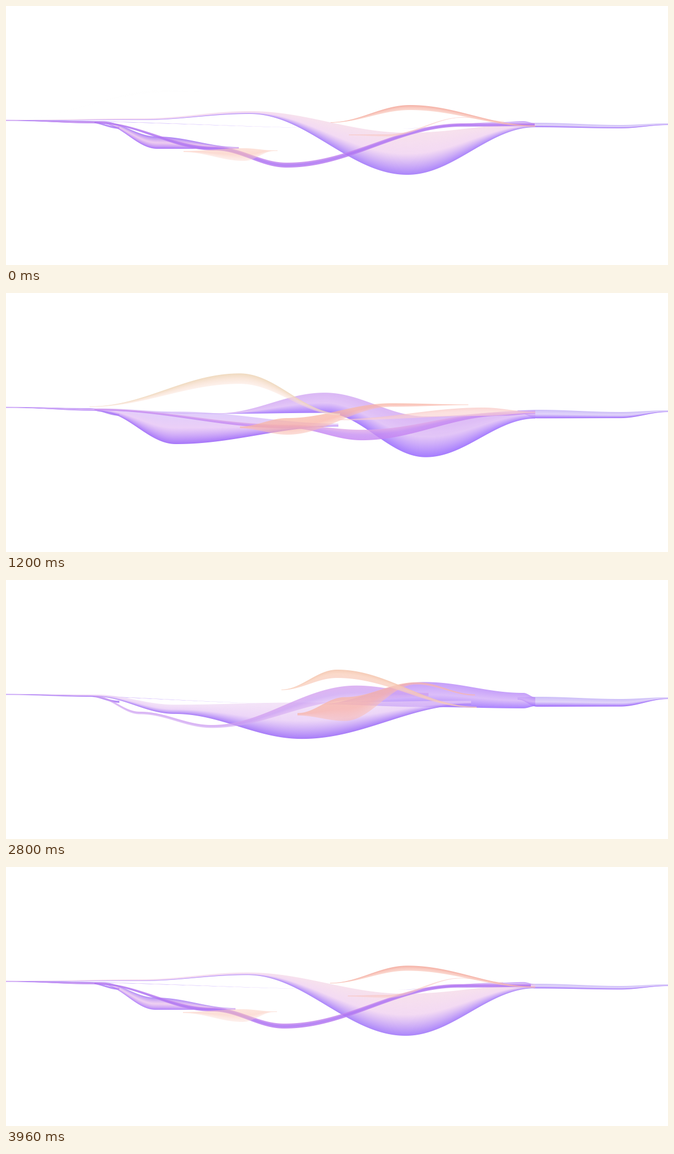
An HTML page with a canvas that plays this animation: 1197 by 468 pixels, repeating every 4 s.

```html
<!DOCTYPE html>
<html lang="en">
<head>
<meta charset="utf-8">
<title>Flowing ribbons</title>
<style>
  html, body { margin: 0; width: 100%; height: 100%; overflow: hidden; background: #fff; }
  canvas { display: block; }
</style>
</head>
<body>
<canvas id="stage" width="1197" height="468"></canvas>
<script>
const ctx = document.getElementById('stage').getContext('2d');
const LOOP = 4;     // seconds
const DRIFT = 113;  // crests travel right, pixels per second
const FADE = 0.4;

const clamp = (v, low, high) => Math.min(high, Math.max(low, v));

// Smooth path through values spread evenly over u = 0..1; a plain number stays constant.
function spread(values, u) {
  if (!Array.isArray(values)) return values;
  const last = values.length - 1;
  const p = clamp(u, 0, 1) * last, i = Math.min(Math.floor(p), last - 1);
  const step = k => values[k + 1] - values[k];
  const slope = k => {
    if (k === 0) return step(0);
    if (k === last) return step(last - 1);
    const a = step(k - 1), b = step(k);
    return a * b > 0 ? 2 * a * b / (a + b) : 0;
  };
  const s = p - i, r = 1 - s;
  return r * r * ((1 + 2 * s) * values[i] + s * slope(i)) +
         s * s * ((1 + 2 * r) * values[i + 1] - r * slope(i + 1));
}

const channels = hex => [0, 2, 4, 6].map(i => parseInt(hex.slice(i, i + 2), 16));
function mixColor(colors, u) {
  const rgba = [0, 1, 2, 3].map(k => spread(colors.map(c => channels(c)[k]), u));
  return `rgba(${rgba[0]},${rgba[1]},${rgba[2]},${rgba[3] / 255})`;
}

const sway = t => Math.cos((t - 3.75) * 2 * Math.PI / LOOP);
const humpX = t => Math.min(900, 185 + 160 * t);

// A node is a crest or trough: x, top edge, bottom edge. Values run over the ribbon's life.
// Colours run from top edge to bottom edge, each a list over the life.
const ribbons = [
  { // stem
    from: 0, to: LOOP, still: true,
    nodes: [[0, 205.7, 207.6], [150, 208, 211], [205, 218, 222]],
    colors: [['be96fab0'], ['a573f5e6'], ['b48cf5c8']]
  },
  { // tail
    from: 0, to: LOOP, still: true,
    nodes: [
      [925, 212, 216],
      [960, 211, [219, 225, 231, 228, 219]],
      [1110, 215, [221, 225, 230, 228, 221]],
      [1197, 212, 215]
    ],
    colors: [['b9a5f5b8'], ['d6c4f8b8'], ['965ffaf0']]
  },
  { // leaf: a trough that swells while it crosses the stage
    from: 0, to: 2 * LOOP,
    nodes: [
      [0, 206, 206.8],
      [t => Math.max(160, DRIFT * t - 205), [208, 209, 203, 225, 222], [212, 213, 206, 225, 222]],
      [t => Math.max(170, DRIFT * t - 12),
        [208, 208, 216, 226, 190, 182, 174, 188, 210], [212, 213, 228, 243, 195, 212, 233, 228, 212]],
      [t => Math.min(935, 213 + DRIFT * t + 65 * sway(t)),
        [236, 212, 233, 220, 229, 226, 204, 204, 208], [258, 273, 273, 291, 305, 301, 258, 228, 218]],
      [t => Math.min(957, 420 + 150 * t), [255, 226, 212, 212, 212], [258, 232, 219, 231, 219]]
    ],
    colors: [
      ['a073f5e6', 'e4ccfa90', 'f4d6e6b8', 'b884f8c8', 'b080f8b0'],
      ['e1aae699', 'e0bef8b0', 'f0d0f0c8', 'cfa8f8c8', 'd2aaf4b0'],
      ['a56efaf2', '9f6ef8f0', 'a57dfaf0', '9a6cffe8', 'a078ffd0']
    ]
  },
  { // strand
    from: 2, to: 6,
    nodes: [
      [160, 209, 212],
      [t => Math.max(165, DRIFT * t - 75), [215, 242, 254, 238, 240], [219, 247, 261, 246, 240]],
      [t => DRIFT * t + 55, [262, 262, 283, 253, 224], [266, 268, 292, 272, 236]],
      [humpX, [200, 190, 212, 216, 213], [230, 216, 218, 222, 216]],
      [t => Math.min(957, humpX(t) + 130), [217, 203, 212, 214, 214], [220, 210, 217, 218, 217]]
    ],
    colors: [
      ['e0b9f0c8', 'c888eccc', 'f4c4e2c0'],
      ['e6c4f090', 'a972f4e0', 'e0a4f0b0'],
      ['eed6f450', 'bd80f0d8', 'cd8cf4d0']
    ]
  },
  { // ember
    from: 0, to: LOOP,
    nodes: [
      [[320, 420, 430, 550, 620], [262, 240, 252, 238, 232], [264, 243, 257, 242, 234]],
      [t => 430 + 65 * t, [257, 231, 211, 212, 232], [280, 256, 256, 254, 236]],
      [[485, 700, 670, 760, 825], [261, 206, 182, 186, 201], [262, 213, 186, 190, 202]],
      [[490, 840, 800, 860, 900], [261, 200, 214, 206, 208], [262, 201, 216, 208, 209]]
    ],
    colors: [
      ['fac8b888', 'f6b09cc8', 'f8c3beaa'],
      ['fac0b090', 'f8aca0cc', 'f9c8c3a0'],
      ['fad2c860', 'f9b4a890', 'fad2cd60']
    ]
  },
  { // veil
    from: 0.4, to: 5.2,
    nodes: [
      [[0, 230, 497, 586, 600], [205, 205, 198, 210, 228], [206, 206, 199, 211, 230]],
      [t => 290 + 110 * t, [151, 144, 162, 179, 207], [165, 164, 177, 188, 222]],
      [[366, 695, 850, 957, 957], [154, 232, 229, 216, 215], [155, 236, 231, 218, 217]]
    ],
    colors: [
      ['f0d6bce0', 'ecd2b2dc', 'f4c4ace0', 'f3a79ae6', 'f8c4c0b0'],
      ['f6decdc0', 'f8dccab0', 'f9cdb8c0', 'f8bcb0cc', 'fad0cea0'],
      ['f8e1d760', 'fad8c860', 'f8c8b8b0', 'f9c8bcb0', 'fad0d0a0']
    ]
  }
];

function drawRibbon({ from, to, still, nodes, colors }, t) {
  const outside = Math.max(from - t, t - to, 0);
  if (outside >= FADE || (still && outside > 0)) return;
  const u = (t - from) / (to - from);
  const points = nodes.map(([x, top, bottom]) =>
    [typeof x === 'function' ? x(t) : spread(x, u), spread(top, u), spread(bottom, u)]);
  const stops = colors.map(list => list.length > 1 ? mixColor(list, u) : '#' + list[0]);
  ctx.globalAlpha = 1 - outside / FADE;
  for (let i = 1; i < points.length; i++) {
    const [x0, top0, bottom0] = points[i - 1], [x1, top1, bottom1] = points[i];
    for (let x = Math.ceil(x0); x < x1; x++) {
      const swing = (1 - Math.cos(Math.PI * (x - x0) / (x1 - x0))) / 2;
      const top = top0 + (top1 - top0) * swing;
      const bottom = bottom0 + (bottom1 - bottom0) * swing;
      if (bottom - top < 0.05) continue;
      const fill = ctx.createLinearGradient(0, top, 0, bottom);
      stops.forEach((color, k) => fill.addColorStop(k / 2, color));
      ctx.fillStyle = fill;
      ctx.fillRect(x, top, 1, bottom - top);
    }
  }
}

function render(now) {
  const t = now / 1000 % LOOP;
  ctx.clearRect(0, 0, 1197, 468);
  for (const ribbon of ribbons)
    for (let lap = 2; lap >= -1; lap--) drawRibbon(ribbon, t + lap * LOOP);
  requestAnimationFrame(render);
}
requestAnimationFrame(render);
</script>
</body>
</html>
```
